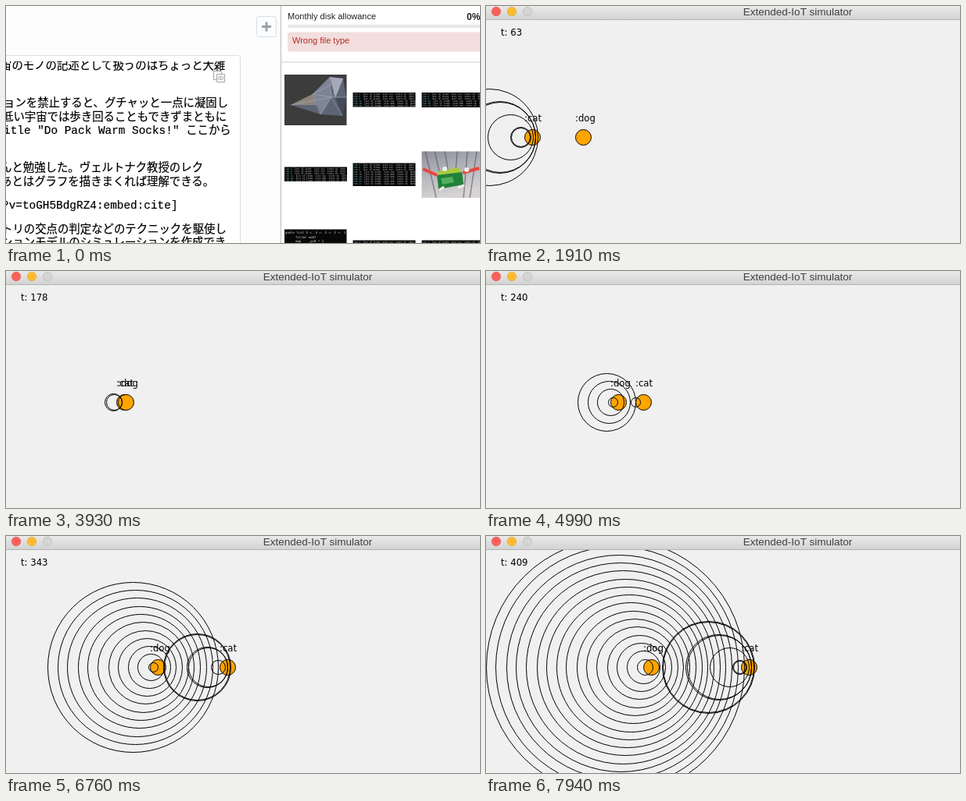
Write an HTML page that moves like this. It is 606 by 304 pixels and loops after 8 s.

```html
<!DOCTYPE html>
<html lang="ja">
<head>
<meta charset="utf-8">
<title>Extended-IoT simulator</title>
<style>
  html, body { margin: 0; width: 100%; height: 100%; overflow: hidden; background: #fff; }
  svg { display: block; width: 606px; height: 304px; }
  text { white-space: pre; }
  .prose { font: 14.4px "Liberation Mono", "Noto Sans CJK JP", "Noto Sans CJK", monospace; stroke: #000; stroke-width: .2; }
  .ui { font: 11px "Liberation Sans", Arial, sans-serif; }
  .term { font: 2.8px "Liberation Mono", monospace; fill: #bbb; }
  .code { font: 4px "DejaVu Sans Mono", monospace; fill: #ddd; }
  .title { font: 13.5px "Liberation Sans", Arial, sans-serif; fill: #404040; }
  #world { font: 11.7px "DejaVu Sans", sans-serif; }
  .body { fill: #ffa500; stroke: #000; }
  .wave { fill: none; stroke: #000; }
</style>
</head>
<body>
<svg viewBox="0 0 606 304">
  <defs>
    <linearGradient id="bar" x2="0" y2="1">
      <stop stop-color="#e9e9e9"/><stop offset="1" stop-color="#d2d2d2"/>
    </linearGradient>
    <linearGradient id="wood" x2=".3" y2="1">
      <stop stop-color="#8d8e9a"/><stop offset=".5" stop-color="#b4b4bb"/>
      <stop offset="1" stop-color="#d6d3d2"/>
    </linearGradient>
    <clipPath id="editor"><rect y="71" width="299" height="233"/></clipPath>
    <clipPath id="photo"><rect x="531.500" y="186.500" width="75" height="59.500"/></clipPath>
  </defs>

  <g id="page">
    <rect width="606" height="304" fill="#fdfdfd"/>
    <path d="M-5 63.5H296.500a3 3 0 0 1 3 3V310H-5z" fill="#fff" stroke="#ddd"/>
    <g id="prose" class="prose" clip-path="url(#editor)"></g>
    <g fill="#fff" stroke="#a5a5a5">
      <path d="M265.500 83.500h10v11h-10z"/>
      <path d="M269.500 87.500h10v10h-10z"/>
      <ellipse cx="274.500" cy="92.500" rx="3.500" ry="2"/>
      <circle cx="274.500" cy="92.500" r=".6"/>
    </g>
    <rect x="320.500" y="13.500" width="25" height="26" rx="3" fill="#fbfdfe" stroke="#d3dfe6"/>
    <path d="M333 20.500v12M327 26.500h12" stroke="#9aa3ab" stroke-width="3"/>

    <rect x="351" width="255" height="304" fill="#fff"/>
    <path d="M351.500 0V304" stroke="#bbb"/>
    <g class="ui">
      <text x="360" y="17" fill="#222">Monthly disk allowance</text>
      <text x="589" y="17.500" fill="#222" font-weight="bold" font-size="12">0%</text>
      <rect x="360" y="24" width="250" height="4" rx="2" fill="#e8e8e8"/>
      <rect x="360" y="33.500" width="250" height="25" rx="3" fill="#f2dede"/>
      <text x="366" y="48" fill="#b52b27">Wrong file type</text>
    </g>
    <rect x="352" y="71" width="254" height="2" fill="#e6e6e6"/>

    <rect x="356" y="88" width="79.500" height="65" fill="#3c3c3c"/>
    <path d="M364 127L392 113 414 91l17 2 4 24-5 24-28-2z" fill="#5d6473"/>
    <path d="M392 113l22-22 2 26-13 22z" fill="#7d8494"/>
    <path d="M364 127l28-14 5 14z" fill="#8d857b"/>
    <path d="M414 91l17 2-10 25z" fill="#a3a9b8"/>
    <path d="M421 118l14-1-5 24z" fill="#444a5a"/>
    <path d="M392 113l10 26 14-22-24-4 39-20-15 24 19 0M414 91l2 26 14 24M364 127l52-10" fill="none" stroke="#a9aebb" stroke-width=".6"/>

    <g id="terms"></g>

    <g clip-path="url(#photo)">
      <path d="M531 186h76v60h-76z" fill="url(#wood)"/>
      <path d="M536 186l14 60M548 186l9 40M561 186l4 24M577 186l-2 24M590 186l-5 60M602 186l-9 60" stroke="#555662" stroke-width="1.500" opacity=".6"/>
      <path d="M533 209l18 8M584 214l21-6" stroke="#e8463f" stroke-width="4"/>
      <path d="M552 212l27-5 4 7-30 4z" fill="#a9c93f"/>
      <path d="M551 217l32-4 2 16-32 6z" fill="#21803a"/>
      <path d="M556 221l15-2 2 7-15 3z" fill="#54b060"/>
      <path d="M554 236l6-4M578 233l8-3" stroke="#eee" stroke-width="3"/>
      <circle cx="561" cy="209" r="3" fill="#eee"/><circle cx="589" cy="210" r="3" fill="#eee"/>
    </g>

    <rect x="356" y="286.500" width="79.500" height="18" fill="#080808"/>
    <g class="code">
      <text x="357" y="291.500">gosh> list 5 &lt;. 4 &lt;. 3 &lt;. 2 &lt;. 1</text>
      <text x="370" y="297.500">filter odd?</text>
      <text x="370" y="302.500">map    _ps9 * 1</text>
    </g>
  </g>

  <g id="sim">
    <rect id="floor" width="606" height="304"/>
    <g id="world"></g>
    <rect width="606" height="18" fill="url(#bar)"/>
    <path d="M0 17.500H606" stroke="#b4b4b4"/>
    <circle cx="13" cy="7" r="5.700" fill="#fc605b" stroke="#e2453f" stroke-width=".6"/>
    <circle cx="33" cy="7" r="5.700" fill="#fdbc30" stroke="#dfa023" stroke-width=".6"/>
    <circle cx="53" cy="7" r="5.700" fill="#d5d5d5" stroke="#bdbdbd" stroke-width=".8"/>
    <text class="title" x="398.500" y="12" text-anchor="middle">Extended-IoT simulator</text>
  </g>
</svg>

<script>
const $ = id => document.getElementById(id);

const prose = [
  [-7, 81, '宙のモノの記述として扱うのはちょっと大雑'],
  [-3, 128.5, 'ョンを禁止すると、グチャッと一点に凝固し'],
  [-5, 147, '低い宇宙では歩き回ることもできずまともに'],
  [-3, 164, 'itle "Do Pack Warm Socks!" ここから'],
  [-7, 212, 'んと勉強した。ヴェルトナク教授のレク'],
  [-7, 230, 'あとはグラフを描きまくれば理解できる。'],
  [-5, 260, '?v=toGH5BdgRZ4:embed:cite]'],
  [-6, 291, 'トリの交点の判定などのテクニックを駆使し'],
  [-6, 308, 'ションモデルのシミュレーションを作成でき'],
];
$('prose').innerHTML = prose.map(([x, y, s]) => `<text x="${x}" y="${y}">${s}</text>`).join('');

// Terminal thumbnails
function terminal(x, y, h) {
  let out = `<rect x="${x}" y="${y}" width="80" height="${h}" fill="#060606"/>`;
  for (let row = 3; row < h; row += 3)
    out += `<text class="term" x="${x + 1}" y="${y + row}">` +
      `<tspan fill="#7bb">run ${row}</tspan>  list of items  size ${row * 37}  state ok  done</text>`;
  return out;
}
$('terms').innerHTML = [
  [443.5, 111, 18.5], [531.5, 111, 19], [356, 206.5, 18.5], [443.5, 201.5, 29.5],
  [443.5, 300.5, 4], [531.5, 300.5, 4],
].map(a => terminal(...a)).join('');

// Two emitters with time-dilated clocks; a wave ends when it reaches the other body.
const LOOP = 8000, OPEN = 500, START = 848, STEP = 118, Y = 168.5;
const MEET = 181.9, DOG_PERIOD = 10 / Math.sqrt(1 - 0.25 ** 2);
const cat = t => 9.1 + 0.8 * t;
const dog = t => 109.2 + 0.25 * t;
const snap = x => Math.floor(x) + 0.5;
const ticks = [[0, 1], [16, 111], [26, 178], [42, 288], [50, 343], [60, 409]];

function tickAt(step) {
  const k = Math.max(1, ticks.findIndex(([s]) => s >= step));
  const [s0, t0] = ticks[k - 1], [s1, t1] = ticks[k];
  return Math.round(t0 + (t1 - t0) * (step - s0) / (s1 - s0));
}

function wave(from, to, born, t) {
  const r = t - born;
  if (r > Math.abs(to(t) - from(born)) + 0.5) return '';
  return `<circle class="wave" cx="${snap(from(born) - 5)}" cy="${Y}" r="${r}"/>`;
}

function body(x, name) {
  const cx = snap(x);
  return `<circle class="body" cx="${cx}" cy="${Y}" r="10"/><text x="${cx - 10.5}" y="148">${name}</text>`;
}

function world(t) {
  let out = `<text x="19" y="38">t: ${t}</text>` + body(cat(t), ':cat') + body(dog(t), ':dog');
  for (let born = 1; born < t; born++)
    if (born * 6 % 100 < 10) out += wave(cat, dog, born, t);
  for (let at = MEET + DOG_PERIOD; Math.round(at) < t; at += DOG_PERIOD)
    out += wave(dog, cat, Math.round(at), t);
  return out;
}

const begin = performance.now();
let shown;
function draw() {
  const ms = (performance.now() - begin) % LOOP;
  const step = ms < OPEN ? -2 : ms < START ? -1 : Math.min(60, Math.floor((ms - START) / STEP));
  if (step !== shown) {
    shown = step;
    $('sim').style.display = step === -2 ? 'none' : '';
    $('floor').setAttribute('fill', step < 0 ? '#eee' : '#f0f0f0');
    $('world').innerHTML = step < 0 ? '' : world(tickAt(step));
  }
  requestAnimationFrame(draw);
}
draw();
</script>
</body>
</html>
```
